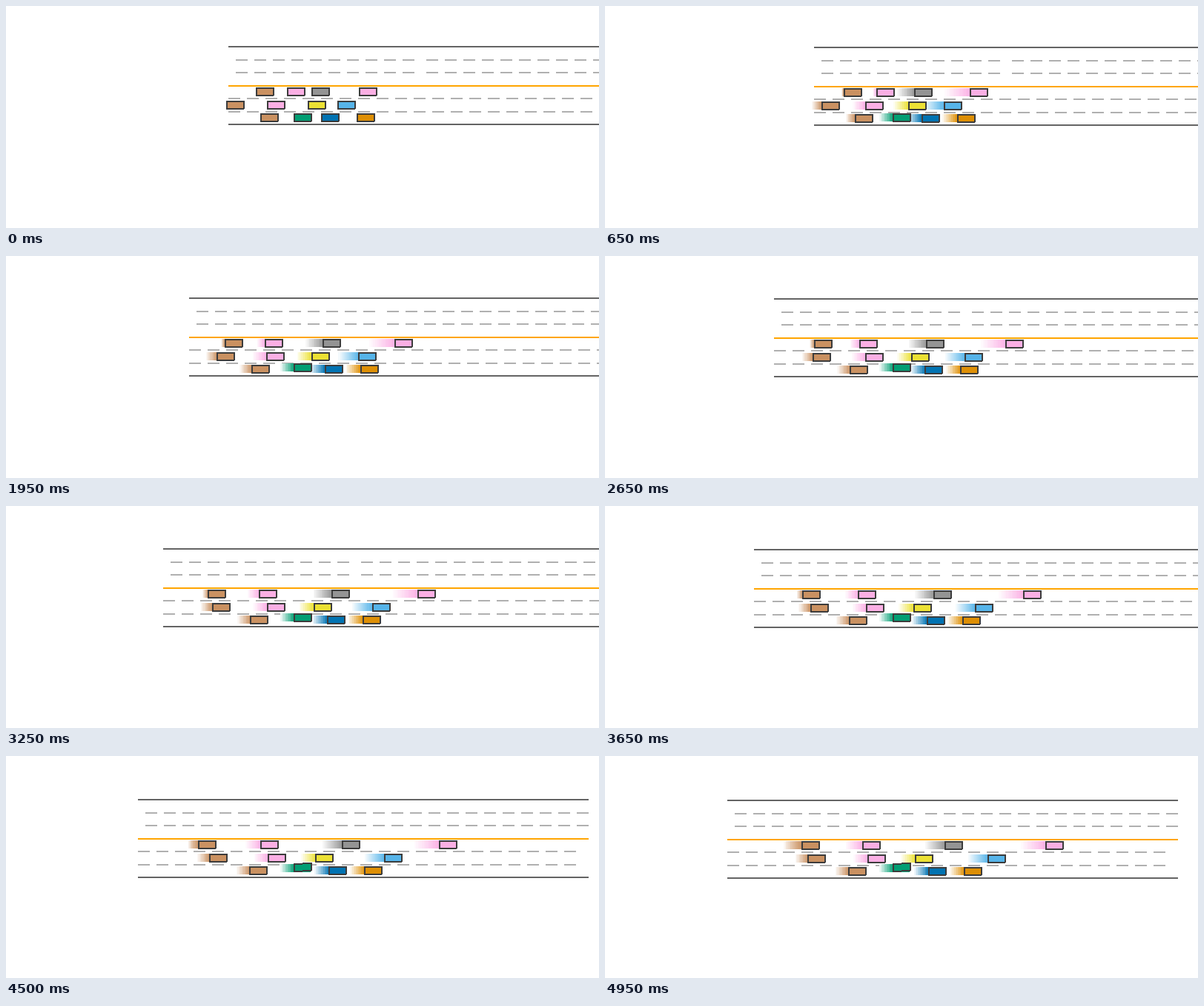
A matplotlib script for the animation above (5 s loop, 800 px wide and 300 px high).

```python
import numpy as np
import matplotlib.pyplot as plt
from matplotlib.animation import FuncAnimation
from matplotlib.collections import PolyCollection
from matplotlib.colors import to_rgb

W, H = 800, 300
FRAMES, STEP = 100, 50
TIMES = np.arange(FRAMES) * STEP / 1000
SPEED = 27.2          # camera speed, px per second
TRAIL = 13            # past positions kept per car
ROAD_X, ROAD_LEN = 300, 608
LANE = 17.5

EDGE, DASH, MIDDLE, OUTLINE = "#646464", "#b0b0b0", "#ffa500", "#3c3c3c"
BROWN, PINK, GREY, YELLOW = "#ca9161", "#fbafe4", "#949494", "#ece133"
SKY, GREEN, BLUE, ORANGE = "#56b4e9", "#029e73", "#0173b2", "#de8f05"

SETTLE = 1 - np.exp(-TIMES)
# The followed car drifts upwards, so the road sinks below it
SINK = 0.75 * TIMES + 1.05 * SETTLE
STEERING = TIMES > 4.3


def px(v):
    return int(np.floor(v + 0.5))


class Car:
    """A car moving relative to the camera, with an optional late burst."""

    def __init__(self, color, lane, x, v=0, accel=0, settle=0, burst=0):
        self.rgb = np.array(to_rgb(color))
        self.followed = color == GREEN
        self.top = px(110 + LANE * lane)
        self.path = (x + v * TIMES + accel * TIMES ** 2 + settle * SETTLE
                     + burst * np.maximum(TIMES - 4, 0) ** 2)

    def y(self, n):
        return self.top + (0 if self.followed else px(SINK[n]))

    def trail(self, n):
        y = self.y(n) + int(self.followed and STEERING[n])
        for k in range(min(TRAIL, n), 0, -1):
            fade = k / (TRAIL + 1)
            x = px(self.path[n - k] - SPEED * k * STEP / 1000)
            yield x, y, 24, 11, self.rgb + (1 - self.rgb) * fade

    def body(self, n):
        x, y = px(self.path[n]), self.y(n)
        rects = [(x, y, 25, 11, OUTLINE), (x, y + 11, 24, 1, OUTLINE),
                 (x + 2, y + 2, 21, 8, self.rgb)]
        if self.followed and STEERING[n]:
            # slight heading: the front half sits one pixel higher
            cut = x + 12
            rects = [part for rx, ry, w, h, c in rects
                     for part in ((rx, ry, cut - rx, h, c),
                                  (cut, ry - 1, rx + w - cut, h, c))]
        return rects


CARS = [
    Car(BROWN, 0, 337, v=-24.1, accel=1.3, burst=17),
    Car(PINK, 0, 379, v=-21.3, accel=2.98),
    Car(GREY, 0, 412, v=3.5, accel=0.98, settle=5),
    Car(PINK, 0, 476, v=24.9, accel=-0.22),
    Car(BROWN, 1, 297, v=-7.9, accel=0.63),
    Car(PINK, 1, 352, v=1.17, settle=-4.3),
    Car(YELLOW, 1, 407, v=2.5, accel=-0.04),
    Car(SKY, 1, 447, v=15, accel=-0.2),
    Car(BROWN, 2, 343, v=-0.4, settle=-13),
    Car(BLUE, 2, 425, v=2.5, accel=-0.04),
    Car(ORANGE, 2, 473, v=2.5, accel=-0.04),
    Car(GREEN, 2, 388),
]


def road(n):
    x, sink = px(ROAD_X - SPEED * TIMES[n]), px(SINK[n])
    upper = [10 + 25 * k + 7 * (k > 9) for k in range(24)]
    lower = [25 * k for k in range(24)]
    rects = []
    for line in range(7):
        y = int(54.5 + LANE * line) + sink
        if line % 3 == 0:
            color = MIDDLE if line == 3 else EDGE
            rects.append((x, y, ROAD_LEN, 2, color))
        else:
            starts = upper if line < 3 else lower
            rects += [(x + s, y, 16, 2, DASH) for s in starts]
    return rects


fig = plt.figure(figsize=(W / 100, H / 100), dpi=100, facecolor="white")
ax = fig.add_axes([0, 0, 1, 1])
ax.set(xlim=(0, W), ylim=(H, 0))
ax.axis("off")
shapes = PolyCollection([], edgecolors="none", linewidths=0, antialiaseds=False)
ax.add_collection(shapes, autolim=False)


def update(n):
    rects = road(n)
    for car in CARS:
        rects += car.trail(n)
    for car in CARS:
        rects += car.body(n)
    shapes.set_verts([[(x, y), (x + w, y), (x + w, y + h), (x, y + h)]
                      for x, y, w, h, _ in rects])
    shapes.set_facecolor([to_rgb(c) for *_, c in rects])
    return [shapes]


anim = FuncAnimation(fig, update, frames=FRAMES, interval=STEP, repeat=True)
plt.show()
```
